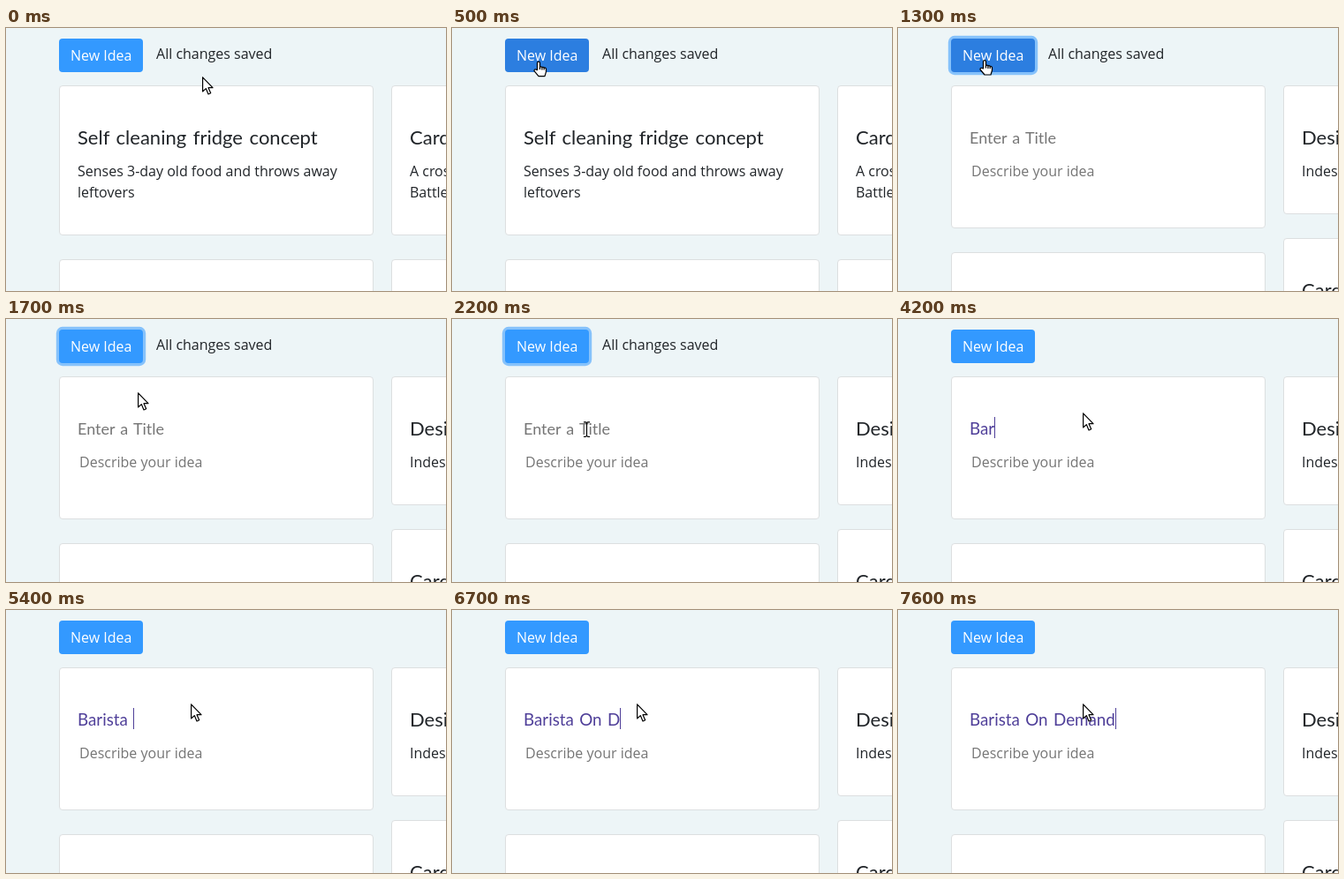
These frames come from a looping animation (498x298 px, 8000 ms). An HTML page:

```html
<!DOCTYPE html>
<html lang="en">
<head>
<meta charset="utf-8">
<title>New idea</title>
<style>
  html, body { margin: 0; width: 100%; height: 100%; overflow: hidden; background: #edf5f7; }
  svg { display: block; }
  text { font: 16px "Open Sans", sans-serif; fill: #212529; white-space: pre; }
  .head { font: 22px Lato, sans-serif; word-spacing: 2px; }
  .field { font: 18.8px Lato, sans-serif; word-spacing: 1.6px; fill: #4f3f99; }
  .hint { fill: #757575; }
  .field.hint { font-size: 18px; }
  .card { fill: #fff; stroke: #dcdfe0; }
  #cursor path { stroke: #000; stroke-width: 1.2; fill: #fff; stroke-linejoin: round; }
  #cursor .line { fill: none; }
</style>
</head>
<body>
<svg width="498" height="298" viewBox="0 0 498 298">
  <rect id="ring" fill="#3399ff"/>
  <rect id="button" x="60" y="12" width="95" height="38" rx="4"/>
  <text x="73" y="37" style="fill:#fff">New Idea</text>
  <text id="saved" x="170" y="35">All changes saved</text>
  <g id="list"></g>
  <g id="editor"></g>
  <g id="form">
    <text id="titleHint" class="field hint" x="81" y="130.5">Enter a Title</text>
    <text id="title" class="field" x="81" y="130.5"></text>
    <text class="hint" x="83" y="168">Describe your idea</text>
    <rect id="caret" y="111" width="1" height="24" fill="#4f3f99" shape-rendering="crispEdges"/>
  </g>
  <g id="cursor">
    <g id="arrow"><path d="M.6 .8V17L4.3 13.6 7 20 9.7 18.8 7 12.7H12Z"/></g>
    <g id="hand">
      <path d="M4.5 10V2.1a1.5 1.5 0 0 1 3 0V6.6q1.5-.9 2.4.3 1.5-.6 2.3.5 1.8-.3 2.3 1.3V12L13 17H6L1 11q0-2.2 2-1.6Z"/>
      <path class="line" d="M7.5 6.5v3M9.9 7v3M12.2 7.5V10"/>
    </g>
    <g id="beam"><path class="line" d="M1 .8h2.3l1.2 1 1.2-1H8M4.5 1.8v14.6M1 17.4h2.3l1.2-1 1.2 1H8"/></g>
  </g>
</svg>
<script>
const LOOP = 8000, TITLE = "Barista On Demand";
const KEY_TIMES = [3400, 4000, 4200, 4700, 4800, 5000, 5100, 5400, 5600,
  5800, 6400, 6700, 6900, 7300, 7400, 7500, 7600];

// time, x, y, pointer shape
const POINTER = [
  [0, 222, 55, "arrow"], [200, 198, 51, "arrow"], [300, 144, 41, "hand"],
  [400, 108, 38, "hand"], [500, 92, 37.6, "hand"], [700, 92, 36, "hand"],
  [1500, 106, 38, "hand"], [1600, 134, 61, "arrow"], [1700, 149, 83, "arrow"],
  [1800, 153, 103, "arrow"], [1900, 154, 124, "beam"], [2100, 150, 119, "beam"],
  [2200, 148, 116, "beam"], [2700, 209, 106, "arrow"]
];
const HOVER = [[0, 0], [300, .6], [400, 1], [1600, .4], [1700, 0]];
const FOCUS = [[0, 0], [1200, .7], [1300, 1], [2400, .55], [2700, 0]];

const $ = id => document.getElementById(id);
const show = (id, on) => $(id).style.display = on ? "" : "none";
const at = (keys, t) => keys.findLast(key => key[0] <= t);

function card(x, y, height, heading = "", ...lines) {
  const left = x + 21;
  return `<rect class="card" x="${x + .5}" y="${y + .5}" width="355" height="${height - 1}" rx="3.5"/>
    <text class="head" x="${left}" y="${y + 67}">${heading}</text>` +
    lines.map((line, i) => `<text x="${left}" y="${y + 103 + 24 * i}">${line}</text>`).join("");
}

const cardGame = ["Card game", "A cross of", "Battle games"];
$("list").innerHTML =
  card(60, 65, 170, "Self cleaning fridge concept", "Senses 3-day old food and throws away", "leftovers") +
  card(436, 65, 170, ...cardGame) + card(60, 262, 170) + card(436, 262, 170);
$("editor").innerHTML =
  card(60, 65, 162) + card(436, 65, 146, "Design shoes", "Indestructible") +
  card(60, 254, 170) + card(436, 238, 170, ...cardGame);

function drawButton(t) {
  const hover = at(HOVER, t)[1], focus = at(FOCUS, t)[1], spread = 3.2 * focus;
  const mix = (a, b) => Math.round(a + (b - a) * hover);
  $("button").setAttribute("fill", `rgb(${mix(51, 44)},${mix(153, 126)},${mix(255, 224)})`);
  const ring = { x: 60 - spread, y: 12 - spread, width: 95 + 2 * spread,
    height: 38 + 2 * spread, rx: 4 + spread, opacity: .55 * focus };
  for (const name in ring) $("ring").setAttribute(name, ring[name]);
}

function drawForm(t) {
  const typed = TITLE.slice(0, KEY_TIMES.filter(time => time <= t).length);
  const editing = t >= 1300;
  show("list", !editing);
  show("editor", editing);
  show("form", editing);
  show("saved", !typed);
  show("titleHint", !typed);
  show("caret", typed || (t >= 2400 && t < 3100));
  $("title").textContent = typed;
  const width = typed && editing ? $("title").getComputedTextLength() : 0;
  $("caret").setAttribute("x", Math.round(81 + Math.max(width, 1)));
}

function drawPointer(t) {
  const [, x, y, shape] = at(POINTER, t);
  $("cursor").setAttribute("transform", `translate(${x} ${y})`);
  for (const id of ["arrow", "hand", "beam"]) show(id, id === shape);
}

function draw() {
  const t = performance.now() % LOOP;
  drawButton(t);
  drawForm(t);
  drawPointer(t);
  requestAnimationFrame(draw);
}
draw();
</script>
</body>
</html>
```
